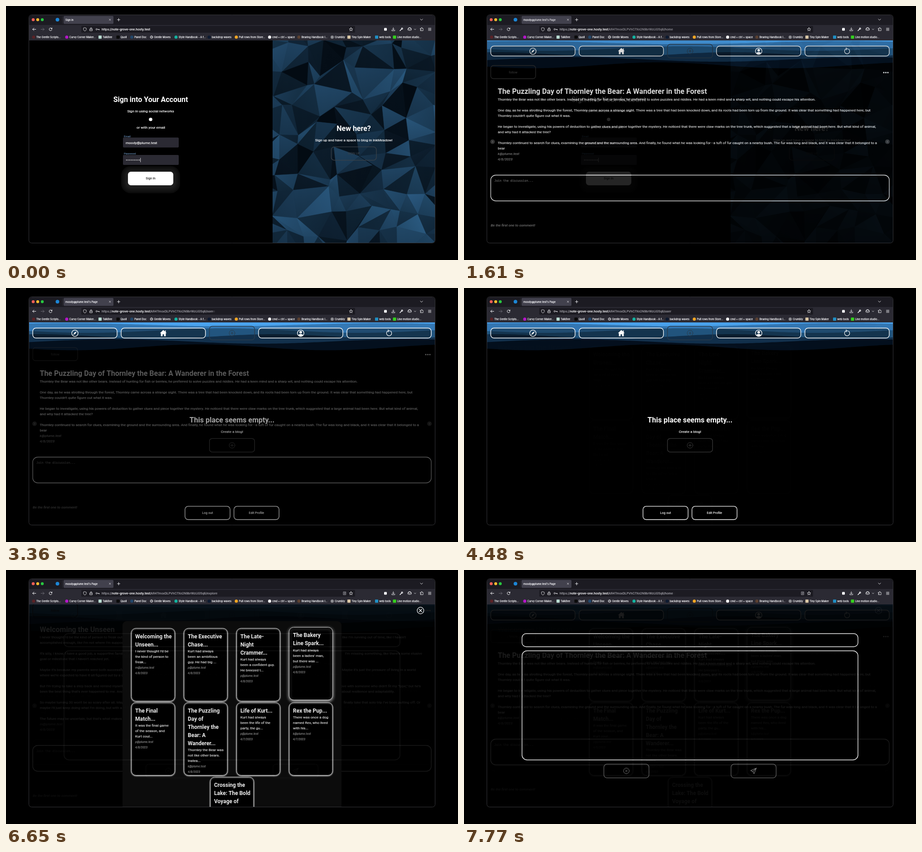
An HTML page with a canvas that plays this animation: 997x561 px, repeating every 8000 ms.

```html
<!DOCTYPE html>
<html lang="en">
<head>
<meta charset="utf-8">
<title>Blog walkthrough</title>
<style>
html, body { margin: 0; width: 100%; height: 100%; overflow: hidden; background: #000; }
canvas { display: block; width: 997px; height: 561px; }
</style>
</head>
<body>
<canvas id="stage" width="997" height="561"></canvas>
<script>
const W = 997, H = 561, LOOP = 8000, STEP = 70;
const SANS = 'Roboto, Arial, sans-serif', UI = 'Inter, Arial, sans-serif', MONO = '"DejaVu Sans Mono", monospace';
const WHITE = '#fbfbfe', GREY = '#8a8a8a', DIM = '#3a3a3a';
const LEFT = 51, TOP = 76, RIGHT = 946, BOTTOM = 523;
const HOST = 'note-grove-one.hosty.test', USER_PATH = '/kR4TmoxDLPVhC7Xe2N9brWzUG5q8/';
const MAIL = 'plume.test';
let c;

// ---------- helpers ----------
function text(s, x, cy, size = 8, o = {}) {
  c.font = `${o.style || ''} ${o.weight || 400} ${size}px ${o.font || SANS}`;
  c.textAlign = o.align || 'left';
  c.fillStyle = c.strokeStyle = o.color || '#fff';
  c.fillText(s, x, cy + size * 0.36);
  // a hairline gives small type the fuller weight of smoothed screen text
  if (size <= 8) {
    c.lineWidth = 0.2;
    c.strokeText(s, x, cy + size * 0.36);
  }
  return c.measureText(s).width;
}
const heading = (s, x, cy, size = 16, align = 'left') => text(s, x, cy, size, { weight: 700, align });
const italic = (s, x, cy, size = 8) => text(s, x, cy, size, { style: 'italic', color: GREY });
const label = (s, x, cy, color = '#fff') => text(s, x, cy, 6.67, { font: UI, align: 'center', color });

function box(x, y, w, h, r, fill, stroke, lw = 1.3) {
  c.beginPath();
  c.roundRect(x, y, w, h, r);
  if (fill) { c.fillStyle = fill; c.fill(); }
  if (stroke) { c.strokeStyle = stroke; c.lineWidth = lw; c.stroke(); }
}
function dot(x, y, r, color) {
  c.beginPath();
  c.arc(x, y, r, 0, Math.PI * 2);
  c.fillStyle = color;
  c.fill();
}
function icon(d, x, y, color = WHITE, lw = 0.9, filled = false) {
  const p = new Path2D(d);
  c.save();
  c.translate(x, y);
  c.strokeStyle = c.fillStyle = color;
  c.lineWidth = lw;
  c.lineCap = c.lineJoin = 'round';
  filled ? c.fill(p) : c.stroke(p);
  c.restore();
}
const ring = r => `M${r} 0A${r} ${r} 0 1 1 ${-r} 0A${r} ${r} 0 1 1 ${r} 0Z`;
const CROSS = 'M-2.2 -2.2L2.2 2.2M2.2 -2.2L-2.2 2.2';
const PLUS = 'M-3 0H3M0 -3V3';
const CHEVRON = 'M-2.6 -1.2L0 1.4L2.6 -1.2';
const RELOAD = 'M2.9 -1.3A3.1 3.1 0 1 0 3 1M3.2 -3.2V-1H1';

function seeded(seed) {
  return () => {
    seed = (seed * 1664525 + 1013904223) >>> 0;
    return seed / 4294967296;
  };
}

// ---------- browser window ----------
const BOOKMARKS = [
  ['The Gentle Scripts...', 61, '#5a2226'], ['Curvy Corner Maker...', 134, '#b415c8'],
  ['TalkBee', 207.5, '#b9dcd2', 1], ['Quoll', 247, '#0a0a0a', 1], ['Panel Doc', 277.5, '#22466a'],
  ['Gentle Moves', 321, ''], ['Style Handbook - A f...', 375, '#12b3a0'],
  ['backdrop waves', 448, '#0d1a30'], ['Pull rows from Store...', 508, '#f5a623'],
  ['cmd + ctrl + space', 581.5, '#f2f2f2'], ['Bearing Handbook I...', 646, '#5b4030'],
  ['Crumbly', 719.5, '#8d8d92'], ['Tiny Spin Maker', 756.5, '#d9c6a5', 1],
  ['web tools', 817.5, '#1f8fc4', 1], ['Line motion studio...', 857, '#35d11e', 1]
];

function chrome(tab, path, reader) {
  box(LEFT, 20, 895, 30, [6, 6, 0, 0], '#1c1b22');
  c.fillStyle = '#2b2a33';
  c.fillRect(LEFT, 42, 895, 34);
  ['#ff5f57', '#febc2e', '#28c840'].forEach((col, i) => dot(60 + i * 10, 30.3, 3.2, col));
  dot(113.5, 30.3, 4, '#1c86d6');
  c.fillStyle = '#3b3a44';
  c.fillRect(124.5, 23, 0.7, 16);
  box(127, 22, 110, 17.5, 2, '#42414d');
  text(tab, 131, 30.7, 5.6, { font: UI, color: WHITE });
  icon('M-1.6 -1.6L1.6 1.6M1.6 -1.6L-1.6 1.6', 229.3, 30.3, WHITE, 0.7);
  icon(PLUS, 248.5, 30.3);
  icon(CHEVRON, 916.5, 30);

  icon('M3.5 0H-3.5M-0.6 -2.9L-3.5 0L-0.6 2.9', 62.3, 51.5, WHITE, 1);
  icon('M-3.5 0H3.5M0.6 -2.9L3.5 0L0.6 2.9', 80.7, 51.5, '#6b6a73', 1);
  icon(RELOAD, 98.3, 51.5, WHITE, 1);
  box(166, 44, 604, 15, 2, '#1c1b22');
  icon('M0 -3.6L3.1 -2.5V0C3.1 2 1.5 3.2 0 3.8C-1.5 3.2 -3.1 2 -3.1 0V-2.5Z', 174, 51.5, WHITE, 0.8);
  icon('M-2.5 -0.4H2.5V3.2H-2.5ZM-1.6 -0.4V-2A1.6 1.6 0 0 1 1.6 -2V-0.4', 187.7, 51.5, WHITE, 0.9);
  icon('M-0.6 0A1.6 1.6 0 1 1 -3.8 0A1.6 1.6 0 1 1 -0.6 0H4V1.6M2.3 0V1.3', 202, 51.5, WHITE, 0.8);
  let x = 211;
  x += text('https://', x, 51.6, 6.7, { font: UI, color: path ? '#a9a8b0' : WHITE });
  x += text(HOST, x, 51.6, 6.7, { font: UI, weight: 500, color: WHITE });
  if (path) text(USER_PATH + path, x, 51.6, 6.7, { font: UI, color: '#a9a8b0' });
  if (reader) icon('M-2.6 -3.2H2.6V3.2H-2.6ZM-1.2 -1.5H1.2M-1.2 0H1.2M-1.2 1.5H0.6', 747, 51.5, '#c9c8cf', 0.7);
  icon('M0 -3.8L1.1 -1.2L3.8 -1L1.7 0.8L2.4 3.5L0 2L-2.4 3.5L-1.7 0.8L-3.8 -1L-1.1 -1.2Z', 761, 51.5, WHITE, 0.8);

  box(834, 48.5, 6, 6, 1.2, WHITE);
  icon('M0 -3.5V1.2M-2 -0.6L0 1.4L2 -0.6M-3.3 1.6V3.4H3.3V1.6', 854.3, 51.3, WHITE, 0.9);
  icon('M-3 3L1 -1', 872, 51.5, WHITE, 1.6);
  icon(ring(1.5), 873.6, 49.9, WHITE, 1.2);
  icon('M-2.6 2.4A3.4 3.4 0 1 1 2.6 2.4M0 0V3', 890.3, 51.3, WHITE, 1.2);
  icon('M-1.6 -0.7L0 0.9L1.6 -0.7', 902.3, 51.5, WHITE, 0.8);
  icon('M-3 -1.8H-1V-3.4H1V-1.8H3V3.3H-3V1.8H-1.5V0H-3Z', 917, 51.3, WHITE, 0.8);
  icon('M-3 -2.4H3M-3 0H3M-3 2.4H3', 934.6, 51.5, WHITE, 0.9);

  for (const [name, bx, col, square] of BOOKMARKS) {
    if (!col) icon(ring(3) + 'M-3 0H3M0 -3C-2 -1 -2 1 0 3C2 1 2 -1 0 -3', bx, 68.7, WHITE, 0.6);
    else if (square) box(bx - 3.5, 65.2, 7, 7, 1, col);
    else dot(bx, 68.7, 3.5, col);
    text(name, bx + 5.7, 68.8, 5.6, { font: UI, color: WHITE });
  }
}

// ---------- page parts ----------
const LIGHT = [[608, 105], [600, 270], [690, 190], [790, 190], [870, 165], [640, 460], [690, 410], [880, 430], [905, 500], [620, 495], [930, 250]];
const SHADE = [[650, 135], [860, 95], [905, 190], [730, 110], [740, 490], [800, 350], [650, 350], [720, 250]];

function lowPoly() {
  const rnd = seeded(41), cols = 9, rows = 11, x0 = 588;
  const cw = (RIGHT - x0) / (cols - 1.2), ch = (BOTTOM - TOP) / (rows - 1.2), pts = [];
  const near = (list, x, y) => list.reduce((s, [a, b]) => s + Math.exp(-((x - a) ** 2 + (y - b) ** 2) / 900), 0);
  for (let j = 0; j <= rows; j++)
    for (let i = 0; i <= cols; i++)
      pts.push([x0 + (i - 0.6 + (rnd() - 0.5) * 0.95) * cw, TOP + (j - 0.6 + (rnd() - 0.5) * 0.95) * ch]);
  const tri = ids => {
    const p = ids.map(k => pts[k]);
    const x = (p[0][0] + p[1][0] + p[2][0]) / 3, y = (p[0][1] + p[1][1] + p[2][1]) / 3;
    const k = Math.max(0.03, Math.min(1, 0.08 + rnd() * 0.78 + 0.4 * near(LIGHT, x, y) - 0.4 * near(SHADE, x, y)));
    const tone = m => `rgb(${2 + 38 * k * m},${9 + 76 * k * m},${16 + 106 * k * m})`;
    const g = c.createLinearGradient(p[0][0], p[0][1], p[2][0], p[2][1]);
    g.addColorStop(0, tone(1.05));
    g.addColorStop(1, tone(0.85));
    c.beginPath();
    p.forEach(q => c.lineTo(q[0], q[1]));
    c.closePath();
    c.fillStyle = c.strokeStyle = g;
    c.lineWidth = 0.6;
    c.fill();
    c.stroke();
  };
  c.save();
  c.beginPath();
  c.rect(x0, TOP, RIGHT - x0, BOTTOM - TOP);
  c.clip();
  c.fillStyle = '#0c2236';
  c.fillRect(x0, TOP, RIGHT - x0, BOTTOM - TOP);
  for (let j = 0; j < rows; j++)
    for (let i = 0; i < cols; i++) {
      const a = j * (cols + 1) + i, b = a + 1, d = a + cols + 1, e = d + 1;
      if (rnd() < 0.5) { tri([a, b, e]); tri([a, e, d]); }
      else { tri([a, b, d]); tri([b, e, d]); }
    }
  c.restore();
}

// colour, mean height, swing, peak position, wavelength
const WAVES = [
  ['#04101e', 131, 6.5, 710, 560], ['#12304c', 118, 5, 560, 640], ['#22557f', 107, 5, 330, 520],
  ['#3478b4', 94, 5, 180, 600], ['#4aa3ee', 81, 3.5, 480, 700]
];
function waves() {
  for (const [col, mid, amp, peak, len] of WAVES) {
    c.beginPath();
    c.moveTo(LEFT, TOP);
    for (let x = LEFT; x <= RIGHT; x += 5) c.lineTo(x, mid + amp * Math.cos((x - peak) * 2 * Math.PI / len));
    c.lineTo(RIGHT, TOP);
    c.fillStyle = col;
    c.fill();
  }
}

function plusButton(x, y, shade) {
  box(x, y, 99.5, 30, 6, null, shade, 1.3);
  icon(ring(6.3) + PLUS, x + 49.8, y + 15.2, shade, 1);
}

function nav() {
  for (const x of [59, 254, 557, 752]) box(x, 88.5, 186, 22, 7, 'rgba(0,0,0,.38)', '#fff', 1.4);
  plusButton(448.8, 84.5, '#2b3b4a');
  icon(ring(7), 152, 99.8, '#fff', 1.3);
  icon('M4 -4L1.2 1.2L-4 4L-1.2 -1.2Z', 152, 99.8, '#fff', 1, true);
  icon('M0 -7L7.5 0H5.4V6.8H1.6V2.4H-1.6V6.8H-5.4V0H-7.5ZM3.6 -6H5.4V-2H3.6Z', 347, 99.8, '#fff', 1, true);
  icon(ring(7.2), 650, 99.8, '#fff', 1.3);
  dot(650, 97.6, 2.9, '#fff');
  icon('M-5 4.6C-4 0.8 4 0.8 5 4.6C2.5 7.4 -2.5 7.4 -5 4.6Z', 650, 99.8, '#fff', 1, true);
  icon('M2.6 -5A5.7 5.7 0 1 1 -2.2 -5.2M-2.4 -7.4L0.6 -5.4L-1.8 -3', 845, 99.8, '#fff', 1.2);
}

function postFrame(followY, dotsY, areaY) {
  box(59, followY, 99, 29, 6, null, '#303030');
  label('follow', 108.5, followY + 14.6, '#3a3a3a');
  for (const x of [926, 930.5, 935]) dot(x, dotsY, 1.6, '#fff');
  [[63, 1], [934, -1]].forEach(([x, d]) => {
    dot(x, 299.8, 5, '#3d3d3d');
    icon(`M${-d} -1.8L${d} 0L${-d} 1.8`, x, 299.8, '#999', 0.8);
  });
  box(59, areaY, 879, 57, 11, null, '#fff', 1.3);
  text('Join the discussion...', 67, areaY + 12.3, 6.5, { font: MONO, color: '#757575' });
  italic('Be the first one to comment!', 59, areaY + 111);
}

const STORY = [
  [206.5, 'Thornley the Bear was not like other bears. Instead of hunting for fish or berries, he preferred to solve puzzles and riddles. He had a keen mind and a sharp wit, and nothing could escape his attention.'],
  [230.5, 'One day, as he was strolling through the forest, Thornley came across a strange sight. There was a tree that had been knocked down, and its roots had been torn up from the ground. It was clear that something had happened here, but'],
  [242.5, "Thornley couldn't quite figure out what it was."],
  [266.5, 'He began to investigate, using his powers of deduction to gather clues and piece together the mystery. He noticed that there were claw marks on the tree trunk, which suggested that a large animal had been here. But what kind of animal,'],
  [278.5, 'and why had it attacked the tree?'],
  [302.5, 'Thornley continued to search for clues, examining the ground and the surrounding area. And finally, he found what he was looking for - a tuft of fur caught on a nearby bush. The fur was long and black, and it was clear that it belonged to a'],
  [314.5, 'bear']
];
function bearPage() {
  waves();
  nav();
  postFrame(131.5, 147, 373.5);
  heading('The Puzzling Day of Thornley the Bear: A Wanderer in the Forest', 74.5, 188.5);
  for (const [y, s] of STORY) text(s, 74.5, y);
  italic('k@' + MAIL, 74.5, 326.5);
  italic('4/8/2023', 74.5, 338.5);
}

// visible beginnings, and endings with their right edge
const MUSING = [
  [148.5, "I never thought I'd be the kind of person to freak out", "like I'm running out of time, like I haven't", 882],
  [160.5, "accomplished enough, like I'm not where I'm supposed"],
  [184.5, "It's silly, I know. I have a good job, a supportive family", "I'm missing something, like there's some elusive", 918],
  [196.5, "goal or milestone that I haven't reached yet."],
  [220.5, "Maybe it's because my parents were both successful", "Maybe it's just the pressure of living in a world", 904],
  [232.5, "where we're expected to have it all figured out by a certain"],
  [256.5, "But I'm trying to take a step back and remind myself", "love with someone who didn't fit my \"type,\" but he's", 915],
  [268.5, "been the best thing that's ever happened to me. And", 'about resilience and adaptability.', 857],
  [292.5, "So maybe turning 30 won't be so scary after all. Maybe", "finally take that solo trip I've been putting off. Or", 914],
  [304.5, "maybe I'll just keep doing what I'm doing, but with a"],
  [328.5, "The future may be uncertain, but that's what makes it"]
];
function musingPage() {
  waves();
  postFrame(74.5, 89.5, 387.5);
  heading('Welcoming the Unseen', 74.5, 131);
  for (const [y, start, end, edge] of MUSING) {
    text(start, 74.5, y);
    if (end) text(end, edge, y, 8, { align: 'right' });
  }
  italic('m@' + MAIL, 74.5, 340.5);
  italic('4/8/2023', 74.5, 352.5);
}

function veil() {
  c.fillStyle = 'rgba(0,0,0,.885)';
  c.fillRect(LEFT, TOP, RIGHT - LEFT, BOTTOM - TOP);
}

const CARDS = [
  [276.5, 129, 'Welcoming the|Unseen...', "I never thought I'd be|the kind of person to|freak...", 'm', 8],
  [392.5, 129, 'The Executive|Chase...', 'Kurt had always|been an ambitious|guy. He had big ...', 'p', 8],
  [508.5, 129, 'The Late-|Night|Crammer...', 'Kurt had always|been a confident guy.|He breezed t...', 'p', 8],
  [624.5, 126.5, 'The Bakery|Line Spark...', "Kurt had always|been a ladies' man,|but there was ...", 'p', 8],
  [276.5, 293, 'The Final|Match...', 'It was the final game|of the season, and|Kurt coul...', 'p', 8],
  [392.5, 293, 'The Puzzling|Day of|Thornley the|Bear: A|Wanderer...', 'Thornley the Bear was|not like other bears.|Instea...', 'k', 8],
  [508.5, 293, 'Life of Kurt...', 'Kurt had always|been the life of the|party, the gu...', 'p', 7],
  [624.5, 293, 'Rex the Pup...', 'There was once a dog|named Rex, who lived|with his...', 'k', 7],
  [450.5, 457.5, 'Crossing the|Lake: The Bold|Voyage of|Otters...', '', '', 8]
];
function card([x, y, title, body, author, day]) {
  const raised = y < 129;
  c.save();
  c.shadowColor = 'rgba(255,255,255,.85)';
  c.shadowBlur = raised ? 7 : 3;
  c.shadowOffsetY = raised ? 2.5 : 1;
  box(x, y, 96, 160.5, 10, '#000', '#dcdcdc', 1);
  c.restore();
  const tx = x + 8.5;
  let ty = y + 17.5;
  for (const s of title.split('|')) { heading(s, tx, ty, 12); ty += 18; }
  ty -= 3;
  if (!body) return;
  for (const s of body.split('|')) { text(s, tx, ty, 8, { color: '#eee' }); ty += 12; }
  italic(author + '@' + MAIL, tx, ty + 0.5, 6.67);
  italic(`4/${day}/2023`, tx, ty + 12.5, 6.67);
}

// ---------- scenes ----------
function signIn() {
  const mid = { align: 'center' };
  heading('Sign into Your Account', 319, 206, 16, 'center');
  text('Sign in using social networks', 319, 232, 8, mid);
  dot(319, 250.5, 3.8, '#fff');
  text('or with your email', 319.5, 268, 8, mid);
  [['Email', 290.5], ['Password', 329]].forEach(([s, y]) => {
    text(s, 260, y - 3, 6, { color: '#58799c' });
    box(258, y, 123, 22, 2, '#2b2a33');
  });
  text('moody@' + MAIL, 264, 301.8);
  for (let i = 0; i < 9; i++) dot(265.7 + i * 3.58, 340.3, 0.95, '#fff');
  c.fillStyle = '#fff';
  c.fillRect(296.3, 335.5, 0.8, 9.5);
  for (let d = 15; d > 0; d -= 3) {
    const v = 12 + (15 - d) * 1.5;
    box(269 - d, 368.5 - d, 100 + 2 * d, 30 + 2 * d, 6 + d, `rgb(${v},${v},${v})`);
  }
  box(269, 366, 100, 30, 6.5, '#fff');
  label('Sign In', 319, 381, '#222');
  lowPoly();
  heading('New here?', 767, 270.5, 16, 'center');
  text('Sign up and have a space to blog in InkMeadow!', 767.3, 296.5, 8, mid);
  box(717.5, 311.2, 99.5, 29.5, 6.5, null, '#3a4148');
  label('SIGN UP', 767.3, 326, '#3a4148');
}

function profile() {
  waves();
  nav();
  heading('This place seems empty...', 498.5, 291.5, 16, 'center');
  text('Create a blog!', 498.5, 317.5, 8, { align: 'center' });
  plusButton(448.8, 332.3, DIM);
  [['Log out', 394.8], ['Edit Profile', 502.8]].forEach(([s, x]) => {
    box(x, 482.2, 99.5, 29.3, 7, null, '#fff');
    label(s, x + 49.7, 497);
  });
}

function explore() {
  musingPage();
  veil();
  box(257, 113, 483, 420, 9, '#0d0d0d');
  CARDS.forEach(card);
  icon(ring(7.3), 914.3, 89.5, '#fff', 1.3);
  icon('M-3 -3L3 3M3 -3L-3 3', 914.3, 89.5, '#fff', 1.3);
}

function compose() {
  bearPage();
  veil();
  box(128, 140.5, 741, 29, 9, null, '#fff', 1.4);
  box(128, 178.5, 741, 241, 11, null, '#fff', 1.4);
  for (const x of [308.5, 589]) box(x, 428.7, 99.5, 30.5, 7, null, '#666', 1.3);
  icon(ring(6.3) + CROSS, 358.2, 443.7, '#777', 1);
  icon('M6.3 -6.3L-6.3 -0.6L-1.6 1.6L1 6.3ZM6.3 -6.3L-1.6 1.6', 638.7, 443.7, '#888', 1.1);
}

function scene(draw, tab, path, reader) {
  const cv = document.createElement('canvas');
  cv.width = W;
  cv.height = H;
  c = cv.getContext('2d');
  c.lineJoin = 'round';
  c.fillStyle = '#000';
  c.fillRect(0, 0, W, H);
  c.save();
  c.beginPath();
  c.roundRect(LEFT, 20, RIGHT - LEFT, BOTTOM - 20, 6);
  c.clip();
  draw();
  chrome(tab, path, reader);
  c.restore();
  box(50.5, 19.5, 896, 504, 6, null, '#36363a', 1);
  return cv;
}

const PAGE = `moody@${MAIL}'s Page`;
const scenes = [
  scene(signIn, 'Sign in', ''),
  scene(bearPage, PAGE, 'home'),
  scene(profile, PAGE, 'user'),
  scene(explore, PAGE, 'explore', true),
  scene(compose, PAGE, 'home', true)
];

// ---------- timeline: eased cross-fades, one every two seconds ----------
const FADE = 1600, FIRST = 400, EVERY = 2000;
const SHOWN = [[490, 1960], [2660, 3990], [4480, 5810], [6650, Infinity]];
const HOLD = 7770;
const ease = k => k * k * (3 - 2 * k);
const out = document.getElementById('stage').getContext('2d');
let last = -1;

function render(now) {
  const t = Math.min(HOLD, Math.floor((now % LOOP) / STEP) * STEP);
  if (t === last) return;
  last = t;
  const i = SHOWN.filter(s => s[0] <= t).length - 1;
  out.globalAlpha = 1;
  out.drawImage(scenes[Math.max(0, i)], 0, 0);
  if (i < 0) return;
  out.globalAlpha = t >= SHOWN[i][1] ? 1 : ease((t - FIRST - i * EVERY) / FADE);
  out.drawImage(scenes[i + 1], 0, 0);
}

const start = performance.now();
function tick() {
  render(performance.now() - start);
  requestAnimationFrame(tick);
}
tick();
</script>
</body>
</html>
```
